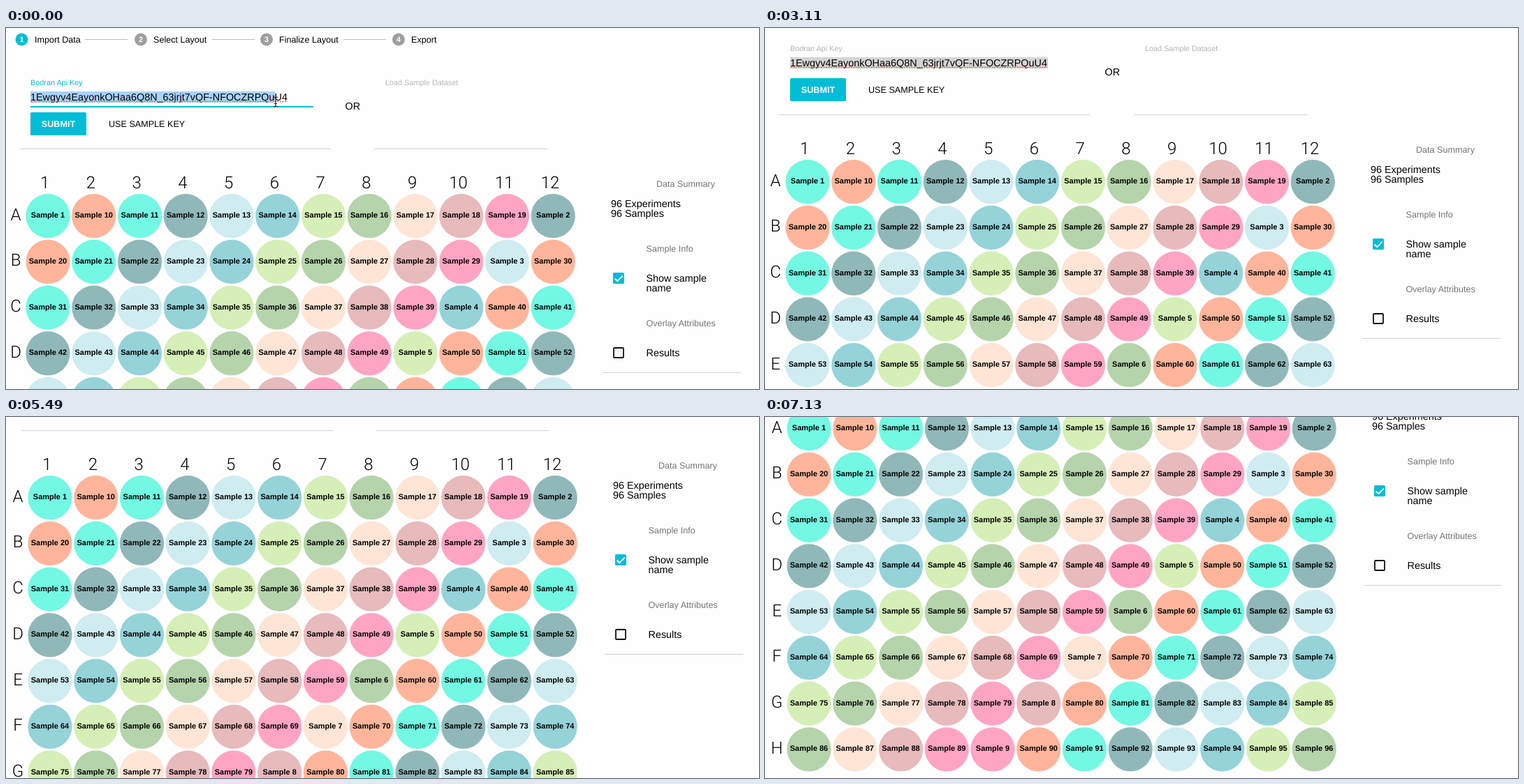
Animation of 1078 by 518 pixels, one loop 8000 ms. Source, as an HTML page:

```html
<!DOCTYPE html>
<html lang="en">
<head>
<meta charset="utf-8">
<title>Plate layout</title>
<style>
html, body { margin: 0; width: 100%; height: 100%; overflow: hidden; background: #fefefe; }
svg { display: block; font-family: "Liberation Sans", Arial, sans-serif; text-rendering: geometricPrecision; }
.big { font: 300 24px Roboto, "Liberation Sans", sans-serif; }
.name { font-weight: bold; font-size: 11px; }
</style>
</head>
<body>
<svg id="stage" width="1078" height="518" viewBox="0 0 1078 518">
  <g id="page"></g>
  <path id="cursor" d="M-3-7q3 0 3 2V5q0 2-3 2M3-7q-3 0-3 2M0 5q0 2 3 2M-2 2.500h4" fill="none" stroke="#111"/>
</svg>
<script>
const page = document.getElementById('page');
const cursor = document.getElementById('cursor');
const TEAL = '#00bcd4', GREY = '#757575', PALE = '#b5b5b5', RULE = '#d2d2d2';
// Well colour follows the last digit of the sample number
const WELLS = ['#ffb59b', '#73f8e3', '#90b8b9', '#cfecf1', '#95d3d9',
  '#d5efb7', '#b5d4ab', '#ffe5d5', '#e7babc', '#ffa5c3'];
const LOOP = 8000, STEP = 148.5, PITCH = 65.75;

function add(tag, attrs, content = '') {
  const el = document.createElementNS('http://www.w3.org/2000/svg', tag);
  for (const key in attrs) el.setAttribute(key, attrs[key]);
  el.textContent = content;
  return page.appendChild(el);
}
const text = (content, x, y, size, fill = '#000', more = {}) =>
  add('text', { x, y, 'font-size': size, fill, ...more }, content);
const rect = (x, y, width, height, fill, more = {}) =>
  add('rect', { x, y, width, height, fill, ...more });
const middle = { 'text-anchor': 'middle' };

// Stepper
[['Import Data', 22.5, 41], ['Select Layout', 193, 211],
 ['Finalize Layout', 373, 391], ['Export', 562, 580]].forEach(([label, cx, x], i) => {
  add('circle', { cx, cy: 16.5, r: 9, fill: i ? '#9e9e9e' : TEAL });
  text(i + 1, cx, 20.3, 10.8, '#fff', { ...middle, 'font-weight': 'bold' });
  text(label, x, 21, 12.6);
});
[113, 295, 483].forEach(x => rect(x, 16, 61, 1, '#bdbdbd'));

// Import form
const keyLabel = text('Bodran Api Key', 35, 82, 10.85);
const selection = rect(35, 91, 350, 16, '#a8d3fb');
text('1Ewgyv4EayonkOHaa6Q8N_63jrjt7vQF-NFOCZRPQuU4', 35, 104, 14.4);
add('path', { d: 'M35.500 105.500H403', stroke: '#f4605a', 'stroke-width': 1.6, 'stroke-dasharray': '2.2 1.4' });
const underline = rect(35, 112, 405, 2, TEAL);
rect(35, 121, 80, 33, TEAL, { rx: 1.5 });
text('SUBMIT', 75, 142, 12.6, '#fff', { ...middle, 'font-weight': 'bold' });
text('USE SAMPLE KEY', 147, 142, 12.6);
text('OR', 485.5, 117, 14.4);
text('Load Sample Dataset', 543, 82, 10.85, PALE);
rect(19, 173, 446, 1, RULE);
rect(527, 173, 248, 1, RULE);

// Plate: samples run in alphabetical order
const order = Array.from({ length: 96 }, (_, i) => String(i + 1)).sort();
for (let c = 0; c < 12; c++) text(c + 1, 55.7 + c * PITCH, 230, 24, '#000', { ...middle, class: 'big' });
[...'ABCDEFGH'].forEach((letter, r) =>
  text(letter, 14, 275.5 + r * PITCH, 24, '#000', { ...middle, class: 'big' }));
order.forEach((n, i) => {
  const x = 60 + i % 12 * PITCH, y = Math.floor(i / 12) * PITCH;
  add('circle', { cx: x, cy: 269.7 + y, r: 31.6, fill: WELLS[n % 10] });
  text('Sample ' + n, x, 272 + Math.round(y), 11, '#000', { ...middle, class: 'name' });
});

// Side panel
text('Data Summary', 931, 228, 12.6, GREY);
text('96 Experiments', 866, 257, 14.4);
text('96 Samples', 866, 271, 14.4);
text('Sample Info', 916.5, 321, 12.6, GREY);
text('Show sample', 916.5, 364, 14.4);
text('name', 916.5, 378, 14.4);
text('Overlay Attributes', 916.5, 428, 12.6, GREY);
text('Results', 916.5, 471, 14.4);
rect(869, 351, 16, 16, TEAL, { rx: 1.8 });
add('path', { d: 'M871.500 359.500l3.800 3.700 7.500-7.500', fill: 'none', stroke: '#fff', 'stroke-width': 1.8 });
rect(870, 459, 14, 14, 'none', { rx: 1, stroke: '#111', 'stroke-width': 1.8 });
rect(854, 494, 198, 1, RULE);

// Points are [step, value]
const scroll = [[12, 0], [17, 19], [24, 72], [31, 117], [33, 129], [35, 129], [37, 154], [44, 242], [48, 253]];
const drift = [[17, 0], [20, 1], [23, 2], [28, 2], [29, 3]];
const cursorX = [[0, 386], [1, 389], [2, 389], [4, 427], [5, 427], [10, 424]];
const cursorY = [[0, 106], [1, 111], [2, 111], [3, 107], [4, 110], [5, 110], [10, -12]];

function at(points, k) {
  const i = points.findIndex(p => p[0] >= k);
  if (i < 0) return points[points.length - 1][1];
  if (i === 0) return points[0][1];
  const [k0, v0] = points[i - 1], [k1, v1] = points[i];
  return v0 + (v1 - v0) * (k - k0) / (k1 - k0);
}
const move = (el, x, y) => el.setAttribute('transform', `translate(${Math.round(x)} ${Math.round(y)})`);

function draw(now) {
  const k = Math.floor((now % LOOP + 16) / STEP);
  const focused = k < 13;
  move(page, at(drift, k), -at(scroll, k));
  move(cursor, at(cursorX, k), at(cursorY, k));
  keyLabel.setAttribute('fill', focused ? TEAL : PALE);
  selection.setAttribute('fill', focused ? '#a8d3fb' : '#d4d4d4');
  selection.setAttribute('width', k < 1 ? 350 : 369);
  underline.setAttribute('visibility', focused ? 'visible' : 'hidden');
  requestAnimationFrame(tick);
}
const start = performance.now();
function tick() { draw(performance.now() - start); }
tick();
</script>
</body>
</html>
```
